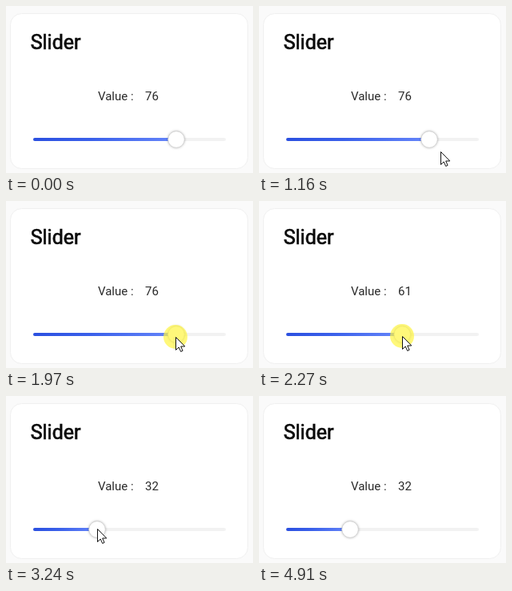
Recreate the animation shown at these times as an HTML page. Size 309x209 px, loop 6230 ms.

```html
<!DOCTYPE html>
<html lang="en">
<head>
<meta charset="utf-8">
<title>Slider</title>
<style>
  html, body { margin: 0; width: 100%; height: 100%; overflow: hidden; background: #fafafa; }
  svg { display: block; width: 100%; height: 100%; }
  text { font: 15px Roboto, sans-serif; fill: #2a2a2a; }
  .title { font-size: 25px; fill: #0c0c0c; stroke: #0c0c0c; stroke-width: .7px; }
  #knob { filter: drop-shadow(0 0 1.5px rgba(0, 0, 0, .28)); }
</style>
</head>
<body>
<svg viewBox="0 0 309 209">
  <defs>
    <linearGradient id="blue">
      <stop offset="0" stop-color="#2b50e0"/>
      <stop offset=".4" stop-color="#3a60ea"/>
      <stop offset="1" stop-color="#6686fa"/>
    </linearGradient>
  </defs>
  <rect x="5.5" y="9.5" width="297" height="194" rx="14" fill="#fff" stroke="#f0f0f0"/>
  <text class="title" x="30.7" y="54.4">Slider</text>
  <text x="115" y="118">Value :</text>
  <text id="value" x="174" y="118">76</text>
  <rect x="34" y="165" width="241" height="4" rx="2" fill="#f2f2f2"/>
  <rect id="fill" x="34" y="165" width="179" height="4" rx="2" fill="url(#blue)"/>
  <circle id="knob" cx="213" cy="167" r="10.3" fill="#fff" stroke="#d0d0d0" stroke-width=".8"/>
  <g id="pointer">
    <circle id="press" r="15" fill="rgb(255,245,65)" fill-opacity=".7"/>
    <path d="M.5 .5V16.5L4.2 13L6.7 18.5L9.1 17.4L6.7 12H11.8Z" fill="#fff" stroke="#111"/>
  </g>
</svg>
<script>
const LOOP = 6230, STEP = 80, PRESS = 1800, RELEASE = 3240;
const linear = k => k;
const easeIn = k => k * k;
const easeOut = k => 1 - (1 - k) ** 2;

// Pointer movements; between them it rests at the last end point
const moves = [
  { start: 640, end: 1640, from: [277, 220], to: [212, 170], ease: easeOut },
  { start: 1960, end: 2680, from: [212, 170], to: [114, 166], ease: linear },
  { start: 3480, end: 4030, from: [114, 166], to: [172, 212], ease: easeIn },
  { start: 4350, end: 4910, from: [160, 212], to: [268, 212], ease: linear, rise: 18 }
];
const $ = id => document.getElementById(id);

// The pointer is sampled every 80 ms, so it moves in small jumps
function pointerAt(time) {
  const base = time < 4000 ? 760 : 4030;
  const t = base + Math.floor((time - base) / STEP) * STEP;
  const { start, end, from, to, ease, rise = 0 } = moves.findLast(move => move.start <= t) ?? moves[0];
  const k = Math.min(1, Math.max(0, (t - start) / (end - start)));
  const mix = axis => from[axis] + (to[axis] - from[axis]) * ease(k);
  return [mix(0), mix(1) - rise * Math.sin(Math.PI * k)].map(Math.round);
}

function valueAt(time) {
  if (time < PRESS) return 76;
  const [x] = pointerAt(Math.min(time, RELEASE));
  return Math.round((x - 41) / 2.25);
}

function draw(now) {
  const time = now % LOOP;
  const [x, y] = pointerAt(time);
  const value = valueAt(time);
  const knobX = 42 + value * 2.25;
  $("value").textContent = value;
  $("fill").setAttribute("width", knobX - 34);
  $("knob").setAttribute("cx", knobX);
  $("pointer").setAttribute("transform", `translate(${x} ${y})`);
  $("press").setAttribute("visibility", time >= PRESS && time < RELEASE ? "visible" : "hidden");
  requestAnimationFrame(draw);
}
requestAnimationFrame(draw);
</script>
</body>
</html>
```
